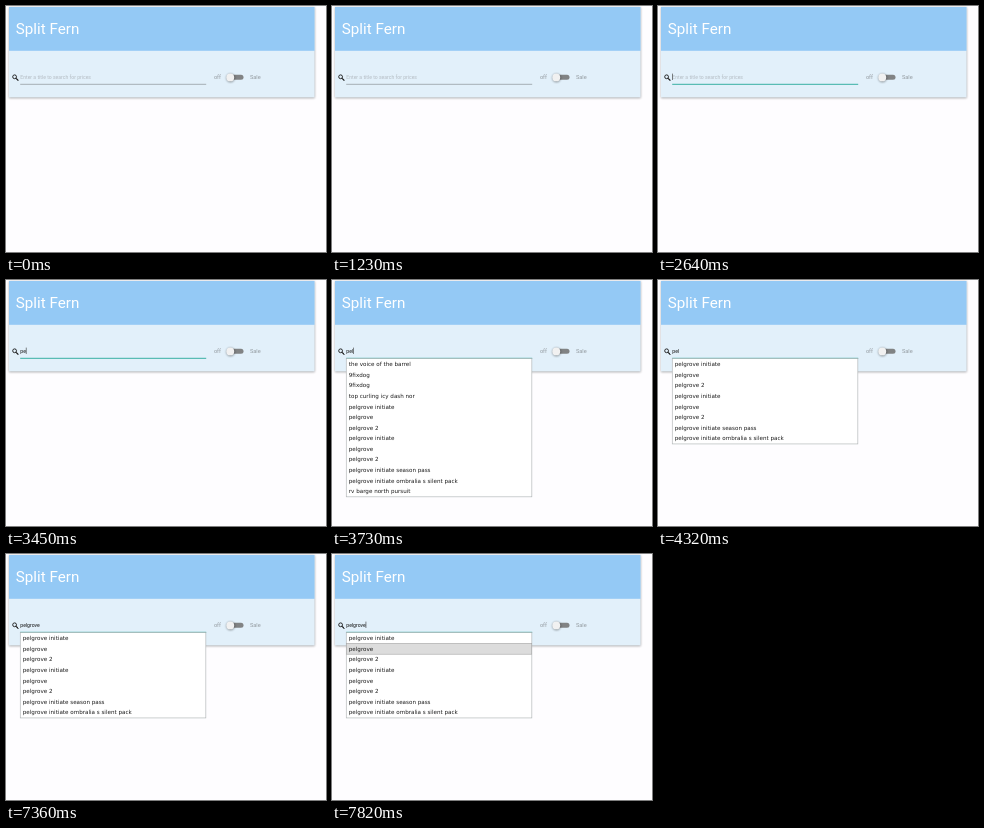
Animation of 320x246 px, one loop 8 s. Source, as an HTML page:

```html
<!DOCTYPE html>
<html lang="en">
<head>
<meta charset="utf-8">
<title>Title search</title>
<style>
  html, body { margin: 0; width: 100%; height: 100%; overflow: hidden; background: #fefdff; }
  svg { display: block; width: 100%; height: 100%; }
  text { font-family: Roboto, sans-serif; white-space: pre; }
  .small { font-size: 5.6px; fill: #939a9f; }
  .field { font-size: 5.1px; }
  #list text { font: 5.6px "DejaVu Sans", Verdana, sans-serif; fill: #1c1c1c; }
</style>
</head>
<body>
<svg viewBox="0 0 320 246">
  <defs>
    <filter id="soft" x="-20%" y="-20%" width="140%" height="140%">
      <feGaussianBlur stdDeviation="0.8"/>
    </filter>
  </defs>

  <rect x="3" y="1.4" width="305.8" height="90.8" fill="#000" opacity=".32" filter="url(#soft)"/>
  <rect x="3" y="1" width="305.5" height="90.3" fill="#e2f0fa"/>
  <rect x="3" y="1" width="305.5" height="43.8" fill="#94c9f5"/>
  <text x="9.8" y="28.4" font-size="15.2" fill="#fff">Split Fern</text>

  <g fill="none" stroke="#151515">
    <circle cx="8.6" cy="70.8" r="1.9" stroke-width=".9"/>
    <path d="M10.1 72.3L12.4 74.6" stroke-width="1.2"/>
  </g>

  <rect id="line" x="14.2" y="77.8" width="186" height="1"/>
  <text id="hint" class="field" x="14.3" y="72.7" fill="#b4bcc3">Enter a title to search for prices</text>
  <text id="typed" class="field" x="14.3" y="72.7" fill="#111"></text>
  <rect id="caret" y="67.6" width=".6" height="6.4" fill="#333"/>

  <text class="small" x="207.9" y="73">off</text>
  <text class="small" x="244" y="73">Sale</text>
  <rect x="222.5" y="68.7" width="15" height="5" rx="2.5" fill="#818384"/>
  <circle cx="224.5" cy="72" r="4.2" fill="#000" opacity=".4" filter="url(#soft)"/>
  <circle cx="224.3" cy="71.4" r="3.9" fill="#f1f1f1"/>

  <g id="list">
    <rect id="panel" x="14.25" y="78.6" width="185.6" fill="#fff" stroke="#a9aeb0" stroke-width=".6"/>
    <rect id="hover" x="14.4" y="89.4" width="185.3" height="10.8" fill="#dcdcdc" stroke="#a5a5a5" stroke-width=".6"/>
    <g id="rows"></g>
  </g>
</svg>
<script>
const LOOP = 8000, FOCUS = 1270, ROW = 10.58, LEFT = 14.3;
const $ = id => document.getElementById(id);

const word = "pelgrove";
const series = ["initiate", "", "2", "initiate", "", "2", "initiate season pass",
  "initiate ombralia s silent pack"].map(s => (word + " " + s).trim());
const broad = ["the voice of the barrel", "9fixdog", "9fixdog", "top curling icy dash nor",
  ...series, "rv barge north pursuit"];

const keys = [3200, 3420, 3640, 5000, 5320, 5440, 5730, 5860];
const blinks = [1270, 1770, 2270, 2770, 3200, 4250, 4650, 6360, 6860, 7340, 7800];
const SHOW = 3560, NARROW = 4040, HOVER = 7730;

const passed = (times, t) => times.filter(x => x <= t).length;
const show = (id, on) => $(id).setAttribute("visibility", on ? "visible" : "hidden");
const mix = (a, b, p) => `rgb(${a.map((v, i) => Math.round(v + (b[i] - v) * p))})`;

let current = null;
function setRows(items) {
  if (items === current) return;
  current = items;
  $("rows").innerHTML = items.map((s, i) =>
    `<text x="16.8" y="${86.2 + i * ROW}">${s}</text>`).join("");
  $("panel").setAttribute("height", items.length * ROW + 0.7);
}

function draw(t) {
  const count = passed(keys, t);
  const p = Math.min(1, Math.max(0, (t - FOCUS) / 300));
  $("line").setAttribute("fill", mix([166, 175, 181], [56, 176, 163], p));
  $("typed").textContent = word.slice(0, count);
  show("hint", !count);

  const end = count ? $("typed").getComputedTextLength() : 0;
  $("caret").setAttribute("x", LEFT + end);
  show("caret", passed(blinks, t) % 2);

  setRows(t < NARROW ? broad : series);
  $("list").style.display = t < SHOW ? "none" : "";
  show("hover", t >= HOVER);
}

const start = performance.now();
function tick() {
  draw((performance.now() - start) % LOOP);
  requestAnimationFrame(tick);
}
tick();
</script>
</body>
</html>
```
